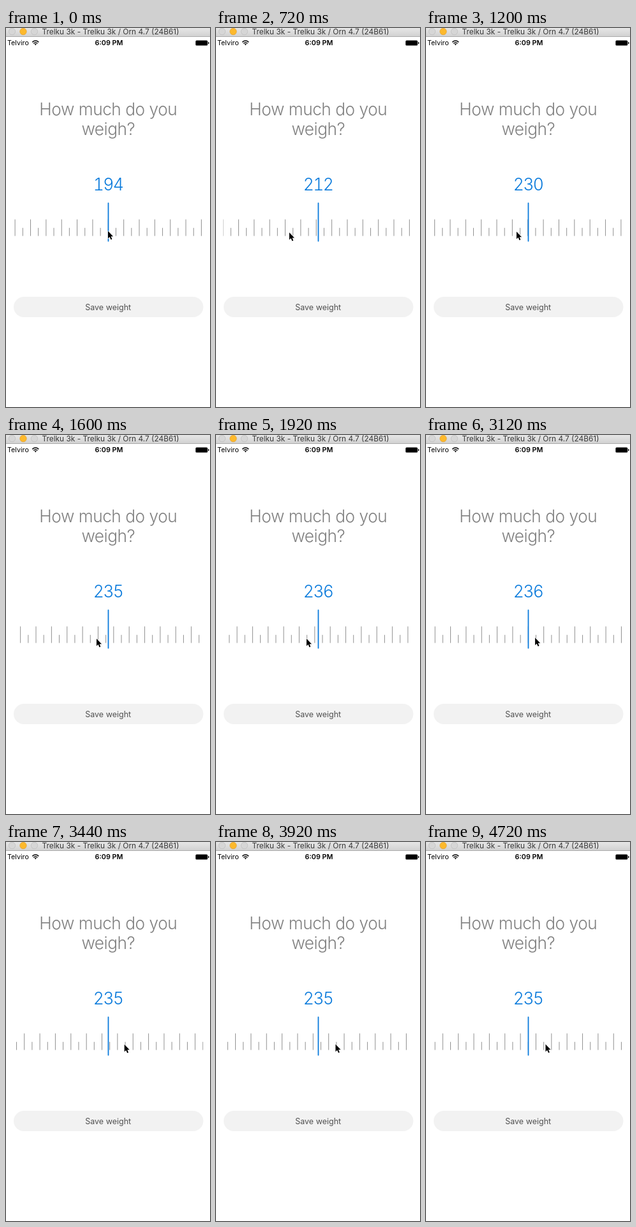
An HTML page that plays this animation: 320x595 px, repeating every 4.8 s.

```html
<!DOCTYPE html>
<html lang="en">
<head>
<meta charset="utf-8">
<title>Weight picker</title>
<style>
  html, body { margin: 0; width: 100%; height: 100%; overflow: hidden; background: #fff; }
  svg { display: block; font-family: Inter, "Liberation Sans", sans-serif; }
  .mid { text-anchor: middle; }
  .light { font-weight: 300; font-size: 26.3px; letter-spacing: -.5px; fill: #808080; }
  #value { font-size: 26.5px; letter-spacing: -1.6px; font-variant-numeric: tabular-nums; fill: #0b7bdc; }
</style>
</head>
<body>
<svg width="320" height="595" viewBox="0 0 320 595">
  <defs>
    <linearGradient id="bar" x2="0" y2="1">
      <stop stop-color="#e6e6e6"/><stop offset="1" stop-color="#d2d2d2"/>
    </linearGradient>
    <clipPath id="dial"><rect x="11.3" y="295" width="298.2" height="40"/></clipPath>
  </defs>

  <!-- window bar -->
  <rect width="320" height="13" fill="url(#bar)"/>
  <rect y="13" width="320" height="1" fill="#ababab"/>
  <g fill="#d6d6d6" stroke="#bcbcbc" stroke-width=".7">
    <circle cx="9.5" cy="5.5" r="5.2"/>
    <circle cx="27" cy="5.5" r="5.2" fill="#fdb92c" stroke="#e0a030"/>
    <circle cx="44.5" cy="5.5" r="5.2"/>
  </g>
  <text class="mid" x="164" y="10" font-size="11.9" fill="#383838">Trelku 3k - Trelku 3k / Orn 4.7 (24B61)</text>

  <!-- status bar -->
  <text x="2" y="27" font-size="10.7">Telviro</text>
  <g fill="none" stroke="#000" stroke-width="1.5">
    <path d="M41.2 22.3Q46.3 17.8 51.4 22.3M43.1 24.3Q46.3 21.6 49.5 24.3"/>
    <path d="M44.7 25.4Q46.3 24.2 47.9 25.4L46.3 27.2Z" fill="#000" stroke="none"/>
  </g>
  <text class="mid" x="161.5" y="27" font-size="10.8" font-weight="600">6:09 PM</text>
  <rect x="297.4" y="19.4" width="18.9" height="8.2" rx="1.6"/>
  <rect x="317" y="22" width="1.4" height="3" rx=".6"/>

  <text class="mid light" x="160.3" y="137">How much do you</text>
  <text class="mid light" x="160.3" y="168">weigh?</text>
  <text class="mid light" id="value" x="160" y="255"></text>

  <path id="ticks" clip-path="url(#dial)" stroke="#858585" stroke-width=".9"/>
  <rect x="159.6" y="274" width="1.8" height="61.5" rx=".9" fill="#0b7bdc"/>

  <rect x="12" y="422" width="297.5" height="32" rx="16" fill="#f2f2f2"/>
  <text class="mid" x="160.2" y="443" font-size="12.5" fill="#505050">Save weight</text>

  <path id="cursor" d="M0 0V11.6L2.6 9.2L4.5 13.5L6.4 12.7L4.6 8.5H8.1Z"
        stroke="#fff" stroke-width="1.2" stroke-linejoin="round" paint-order="stroke"/>
</svg>
<script>
const LOOP = 4800, STEP = 80, GAP = 12.18, CENTER = 160.3;
const get = id => document.getElementById(id);
const value = get('value'), ticks = get('ticks'), cursor = get('cursor');

// Turning points of the pointer: time, x
const turns = [
  [0, 160], [240, 88], [660, 160], [900, 57], [1200, 142],
  [2800, 142], [3600, 187.5], [LOOP, 187.5]
];

const easeOut = k => 1 - (1 - k) ** 2;

function pointerX(t) {
  const i = turns.findIndex(p => p[0] > t);
  const [t0, x0] = turns[i - 1], [t1, x1] = turns[i];
  return x0 + (x1 - x0) * easeOut((t - t0) / (t1 - t0));
}

// Weight under the needle: drags follow the pointer, releases coast to rest
function weight(t, x) {
  const drag = (from, grab) => from + (grab - x) / GAP;
  const coast = (from, rest, since) => rest + (from - rest) * Math.exp((since - t) / 284);
  if (t < 240) return drag(194, 160);
  if (t < 660) return coast(199.9, 211.1, 240);
  if (t < 900) return drag(208.55, 160);
  const w = Math.min(coast(217, 237, 900), drag(236, 171.1));
  const snap = easeOut(Math.min(1, Math.max(0, (t - 4160) / 320)));
  return w + (235 - w) * snap;
}

function draw(now) {
  const t = Math.floor(now % LOOP / STEP) * STEP;
  const x = pointerX(t), y = 317.6 + (188 - x) * 0.045, w = weight(t, x);
  const first = Math.floor(w) - 13;
  let d = '';
  for (let n = first; n < first + 28; n++)
    d += `M${(CENTER + (n - w) * GAP).toFixed(2)} ${n % 2 ? 313.8 : 300.5}V326.5`;
  ticks.setAttribute('d', d);
  value.textContent = Math.round(w);
  cursor.setAttribute('transform', `translate(${x} ${y})`);
}

const start = performance.now();
(function loop() {
  draw(performance.now() - start);
  requestAnimationFrame(loop);
})();
</script>
</body>
</html>
```
